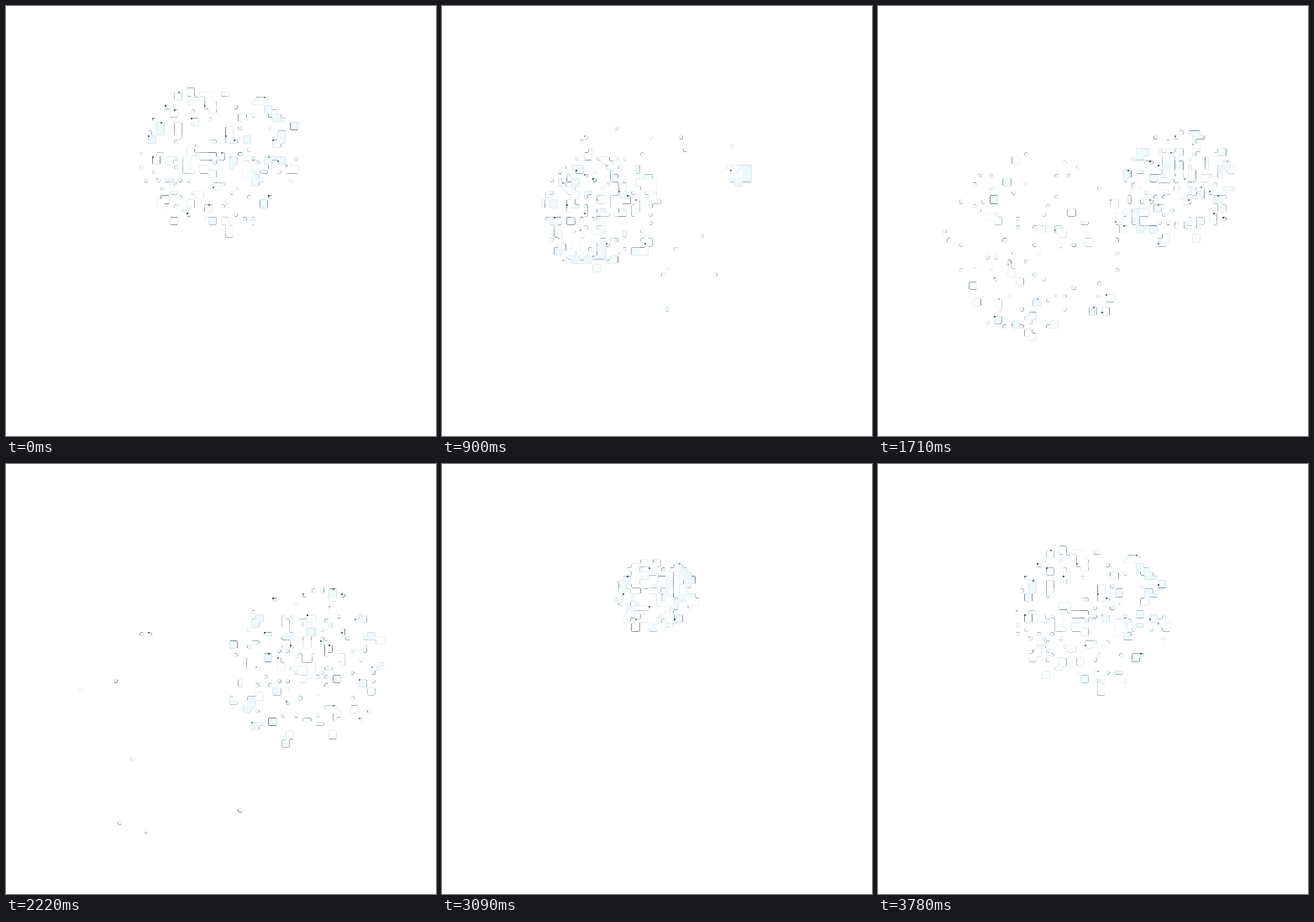
These frames come from a looping animation (512x512 px, 3810 ms). An HTML page with a canvas:

```html
<!DOCTYPE html>
<html lang="en">
<head>
<meta charset="utf-8">
<title>Fireworks</title>
<style>
  html, body { margin: 0; width: 100%; height: 100%; overflow: hidden; background: #fff; }
  canvas { display: block; width: 512px; height: 512px; }
</style>
</head>
<body>
<canvas id="stage" width="512" height="512"></canvas>
<script>
const ctx = document.getElementById('stage').getContext('2d');
const LOOP = 3810, STEP = 30, CELL = 5.12, GRID = 100;
const GRAVITY = 2.1e-5, DRAG = 1700;
const INKS = ['#3c4a50', '#55666c', '#6f7a80', '#4f7078', '#6d8ca6'];

let seed = 7;
const random = () => (seed = seed * 16807 % 2147483647) / 2147483647;

function makeBurst(x, y, start, reach, count) {
  const sparks = Array.from({ length: count }, () => {
    const angle = random() * Math.PI * 2;
    const speed = reach * random() ** 0.58;
    return {
      vx: Math.cos(angle) * speed,
      vy: Math.sin(angle) * speed,
      life: 1500 + 760 * random() ** 1.5,
      size: random() < 0.72 ? 1 : 2,
      ink: INKS[Math.floor(random() * INKS.length)],
      shade: 0.3 + 0.7 * random(),
      pale: random() < 0.4
    };
  });
  return { x, y, start, sparks };
}

const bursts = [
  makeBurst(255, 151, 2600, 183, 165),
  makeBurst(186, 228, 30, 177, 165),
  makeBurst(353, 198, 820, 170, 150)
];

// Snap the living sparks to the coarse grid.
function occupy(t) {
  const cells = new Map();
  for (const { x, y, start, sparks } of bursts) {
    const age = (t - start + LOOP) % LOOP;
    const spread = 1 - Math.exp(-age / DRAG);
    const fall = GRAVITY * age * age;
    for (const s of sparks) {
      if (age > s.life) continue;
      const size = age < 1900 ? s.size : 1;
      const col = Math.floor((x + s.vx * spread) / CELL);
      const row = Math.floor((y + s.vy * spread + fall) / CELL);
      for (let i = 0; i < size; i++)
        for (let j = 0; j < size; j++) cells.set((row + j) * GRID + col + i, s);
    }
  }
  return cells;
}

function rect(color, alpha, x, y, w, h) {
  ctx.globalAlpha = alpha;
  ctx.fillStyle = color;
  ctx.fillRect(x, y, w, h);
}

const isStrong = line => line % 5 === 1 || line % 5 === 4;

function edge(s, line, x, y, w, h) {
  if (isStrong(line)) rect(s.ink, 0.65 * s.shade, x, y, w, h);
  else rect('#8fbcc8', 0.3 * s.shade, x, y, w, h);
}

function draw(t) {
  ctx.globalAlpha = 1;
  ctx.clearRect(0, 0, 512, 512);
  const cells = occupy(t);
  for (const [key, s] of cells) {
    const col = key % GRID, row = Math.floor(key / GRID);
    const x = Math.round(col * CELL), y = Math.round(row * CELL);
    const w = Math.round((col + 1) * CELL) - x, h = Math.round((row + 1) * CELL) - y;
    const left = !cells.has(key - 1), right = !cells.has(key + 1);
    const top = !cells.has(key - GRID), bottom = !cells.has(key + GRID);
    if (s.pale) rect('#eaf6f9', 0.7, x, y, w, h);
    if (top) edge(s, row, x + left, y, w - left - right, 1);
    if (bottom) edge(s, row + 1, x + left, y + h - 1, w - left - right, 1);
    if (left) edge(s, col, x, y + top, 1, h - top - bottom);
    if (right) edge(s, col + 1, x + w - 1, y + top, 1, h - top - bottom);
    if ((col * 7 + row * 13) % 9 === 0 && (left || top)) {
      rect('#20363c', 0.8 * s.shade, x, y, 2, 2);
    }
  }
}

function tick() {
  const t = performance.now() % LOOP;
  draw(Math.floor(t / STEP) * STEP);
  requestAnimationFrame(tick);
}
tick();
</script>
</body>
</html>
```
